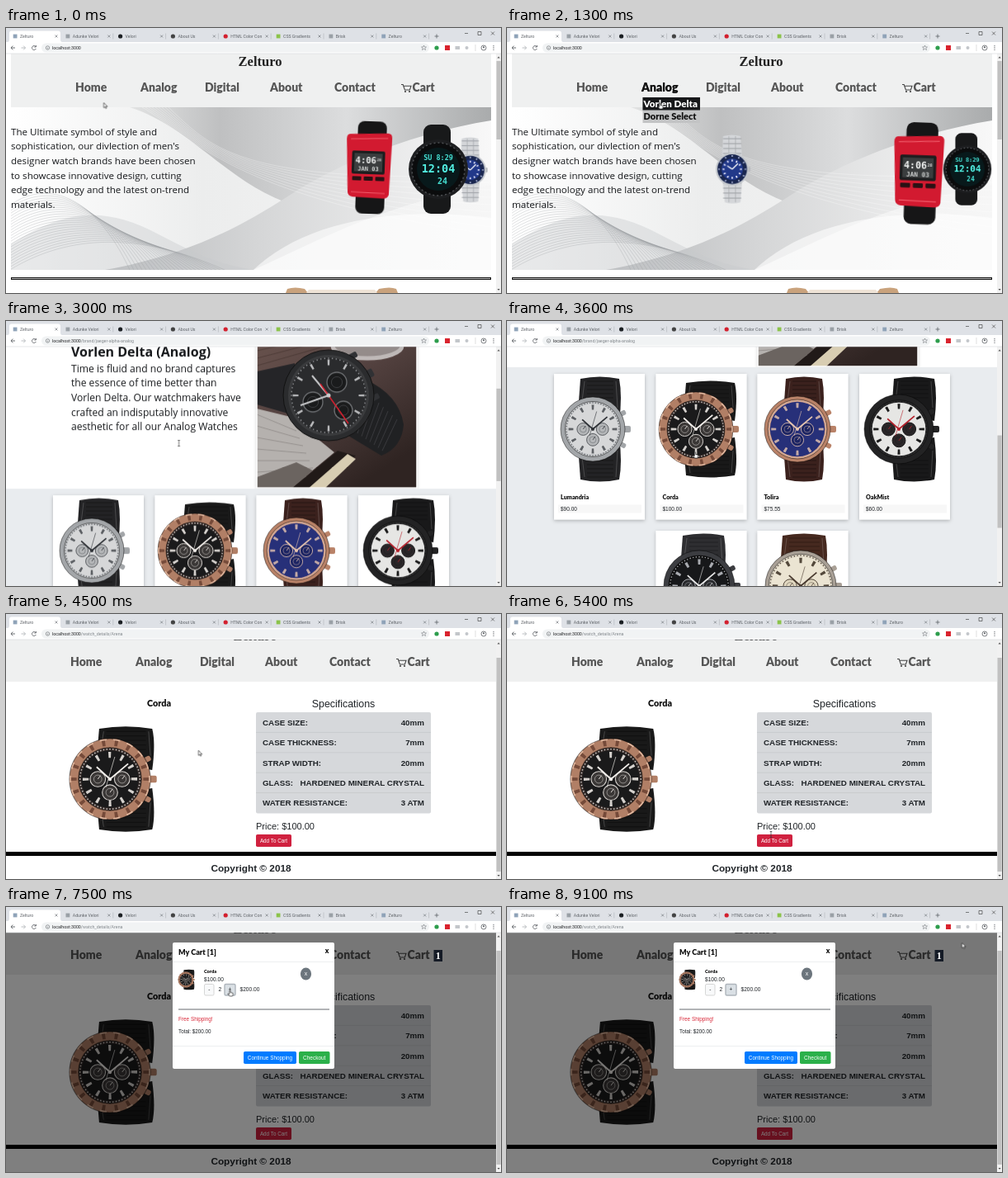
An HTML page for the animation above (9200 ms loop, 600x321 px).

```html
<!DOCTYPE html>
<html lang="en">
<head>
<meta charset="utf-8">
<title>Watch shop</title>
<style>
html, body { margin: 0; width: 100%; height: 100%; overflow: hidden; background: #fff; }
svg { display: block; width: 100vw; height: 100vh; }
text { white-space: pre; }
.body { font-family: 'Open Sans', sans-serif; font-size: 11.6px; fill: #16181b; }
.name { font-family: Lato, sans-serif; font-weight: 900; fill: #111; }
.nav { font-family: Lato, sans-serif; font-weight: 900; font-size: 14px; fill: #555; }
.logo { font-family: 'Liberation Serif', serif; font-weight: 700; font-size: 16.5px; fill: #222; }
.ui { font-family: 'Liberation Sans', sans-serif; fill: #212529; }
.bold { font-weight: 700; }
.tab { font-family: Roboto, sans-serif; font-size: 5.2px; fill: #5f6368; }
.mid { text-anchor: middle; }
.end { text-anchor: end; }
.white { fill: #fff; }
.black { fill: #111; }
.red { fill: #d92b3c; }
.lcd { font-family: 'DejaVu Sans Mono', monospace; font-weight: 700; text-anchor: middle; }
</style>
</head>
<body>
<script>
const LOOP = 9200;
let css = '';

const text = (x, y, cls, str, size, extra = '') =>
  `<text x="${x}" y="${y}" class="${cls}" ${size ? `style="font-size:${size}px"` : ''} ${extra}>${str}</text>`;
const rect = (x, y, w, h, fill, extra = '') =>
  `<rect x="${x}" y="${y}" width="${w}" height="${h}" fill="${fill}" ${extra}/>`;
const circle = (x, y, r, fill, extra = '') =>
  `<circle cx="${x}" cy="${y}" r="${r}" fill="${fill}" ${extra}/>`;
const path = (d, fill, extra = '') => `<path d="${d}" fill="${fill}" ${extra}/>`;
const line = (d, color, w = 1, extra = '') =>
  `<path d="${d}" fill="none" stroke="${color}" stroke-width="${w}" ${extra}/>`;
const ticks = (r, n, w, share, color) =>
  circle(0, 0, r, 'none', `stroke="${color}" stroke-width="${w}" pathLength="${n}" stroke-dasharray="${share} ${1 - share}" stroke-dashoffset="${share / 2}"`);
const group = (id, inner) => `<g id="${id}">${inner}</g>`;
const at = (x, y, inner, s = 1) => `<g transform="translate(${x} ${y}) scale(${s})">${inner}</g>`;
const turn = (deg, inner) => `<g transform="rotate(${deg})">${inner}</g>`;
const many = (n, fn) => Array.from({ length: n }, (_, i) => fn(i)).join('');

// Keyframes from [ms, declarations] pairs
function anim(id, keys, ease = 'linear') {
  const all = [[0, keys[0][1]], ...keys, [LOOP, keys[keys.length - 1][1]]];
  css += `@keyframes ${id}{${all.map(([t, d]) => `${(t / LOOP * 100).toFixed(3)}%{${d}}`).join('')}}
#${id}{animation:${id} ${LOOP}ms ${ease} infinite}`;
}
function show(id, ...spans) {
  const keys = [[0, 'opacity:0']];
  for (const [from, to] of spans) {
    keys.push([from, 'opacity:1']);
    if (to < LOOP) keys.push([to, 'opacity:0']);
  }
  anim(id, keys[1][0] ? keys : keys.slice(1), 'step-end');
}
const move = (x, y, s = 1) => `transform:translate(${x}px,${y}px) scale(${s})`;

// Analog watch, case centred on the origin
function watch({ r = 40, left = -15, right = 32, len = 61, face = .86, strap, rim, ring, dial, mark, sub, hand, knurl }) {
  const band = k => path(`M${left - 3},${20 * k}L${left},${len * k}Q${(left + right) / 2},${(len + 5) * k} ${right},${len * k}Q${right + 4},${40 * k} ${right},${10 * k}Z`, strap)
    + line(`M${left + 5},${(len - 3) * k}L${left + 2},${34 * k}M${right - 4},${(len - 3) * k}L${right - 2},${26 * k}`, '#fff', .6, 'opacity=".3"')
    + many(5, i => line(`M${left + 8},${(len - 3 - i * 5) * k}H${right - 7}`, '#000', 1.2, 'opacity=".3"'));
  return band(-1) + band(1)
    + rect(r - 3, -4, 10, 8, rim, 'rx="2"')
    + [-1, 1].map(k => turn(28 * k, rect(r - 3, -3, 9, 6, rim, 'rx="2"'))).join('')
    + circle(0, 0, r, rim, 'stroke="#0007" stroke-width="1"')
    + (knurl ? ticks(r - 4, 18, 8, .25, knurl) + ticks(r - 1, 18, 1.5, .5, '#e2b9a0') : '')
    + circle(0, 0, r * face, ring, 'stroke="#0007" stroke-width="1"')
    + circle(0, 0, r * (face - .07), dial)
    + ticks(r * (face - .18), 12, r * .15, .2, mark)
    + ticks(r * (face - .04), 60, 1.4, .35, mark)
    + [[-.3, 0], [.3, 0], [0, .33]].map(([x, y]) =>
        circle(x * r, y * r, r * .19, sub, `stroke="${mark}" stroke-width="1"`)
        + circle(x * r, y * r, r * .1, 'none', `stroke="${mark}" stroke-width=".5"`)
        + line(`M${x * r},${y * r}l3,-4`, hand, .8)).join('')
    + line(`M0,0L${-r * .33},${-r * .3}M0,0L${r * .45},${-r * .38}`, hand, 1.7)
    + line(`M${-r * .1},${r * .2}L${r * .12},${-r * .55}`, hand, .6) + circle(0, 0, 2, hand);
}
const STYLES = {
  silver: { strap: '#232325', rim: '#a3a6a9', ring: '#c6c8ca', dial: '#d6d7d8', mark: '#5d6064', sub: '#b4b6b8', hand: '#303338', r: 39 },
  rose: { strap: '#191919', rim: '#b17f66', ring: '#352c2a', dial: '#1a1a1b', mark: '#d5d1cd', sub: '#3a3736', hand: '#f2eeea', knurl: '#754a39', r: 45, left: -12, right: 47, len: 56, face: .78 },
  blue: { strap: '#3b211d', rim: '#b98268', ring: '#d6a58c', dial: '#273079', mark: '#c3a9a6', sub: '#1c2463', hand: '#e4c3af', left: -14, right: 30, face: .9 },
  black: { strap: '#19191a', rim: '#232324', ring: '#2b2b2c', dial: '#e6e6e4', mark: '#1b1b1b', sub: '#2a2628', hand: '#b5222d', r: 42, left: -6, right: 43, face: .84 },
  dark: { strap: '#2e2e31', rim: '#3c3d41', ring: '#111', dial: '#17181a', mark: '#a9abb0', sub: '#292a2d', hand: '#e6e6e6', r: 43, left: -20, right: 30 },
  cream: { strap: '#46291f', rim: '#a9a096', ring: '#ded6c6', dial: '#ebe4d2', mark: '#54493c', sub: '#e0d7c0', hand: '#4a3b30', r: 43, left: -22, right: 30, face: .9 }
};
const model = key => watch(STYLES[key]);

const redWatch = turn(2, `${rect(-15, -56, 35, 112, '#161617', 'rx="8"')}
${path('M-24,-40L22,-42Q27,-42 27,-36L25,32Q24,37 18,37L-19,36Q-25,35 -25,30L-28,-34Q-28,-40 -24,-40Z', '#d21a30')}
${line('M-23,-34L22,-36M-21,30L20,31', '#ef5a69', 1.2)}
${rect(-21, -20, 40, 28, '#1c1d1e', 'rx="2"')}${rect(-18, -17, 34, 22, '#3a3d3e')}
${text(-4, -5, 'lcd', '4:06', 10.5, 'fill="#f1f3f2"')}${text(12, -8, 'lcd', '28', 4.5, 'fill="#ddd"')}
${text(-1, 4, 'lcd', 'JAN 03', 7, 'fill="#cfd2d1"')}
${[-20, -6, 8].map(x => rect(x, 11, 11, 5, '#2a1114', 'rx="1"')).join('')}`);

const blackWatch = rect(-18, -54, 33, 108, '#18191a', 'rx="9"')
  + circle(0, 0, 36, '#1d1e20') + circle(0, 0, 32, '#0b0c0d', 'stroke="#4b4d50" stroke-width="1.5" stroke-dasharray="2 3"')
  + circle(0, 0, 26, '#08191b')
  + text(0, -11, 'lcd', 'SU 8:29', 8.5, 'fill="#45dfd2"') + text(0, 4, 'lcd', '12:04', 13.5, 'fill="#52f0e2"')
  + text(5, 18, 'lcd', '24', 10, 'fill="#45dfd2"');

const steelWatch = path('M-11,-40Q0,-43 10,-40L13,0L10,40Q0,43 -9,40L-13,0Z', '#d4d6d9')
  + many(13, i => line(`M-11,${-37 + i * 6}H11`, '#8f9398', .8)) + line('M-4,-40V40M4,-40V40', '#a4a8ac', .7)
  + rect(17, -3, 5, 6, '#b6b9bd', 'rx="1"') + circle(0, 0, 20, '#c4c8cd') + circle(0, 0, 18, '#1a2750')
  + ticks(16, 12, 2, .2, '#aab4d6') + circle(0, 0, 13, '#22398a') + ticks(10.5, 12, 2.4, .3, '#eef')
  + line('M0,0L-6,-4M0,0L7,-7', '#fff', 1.3);

function header(x0, w, dx) {
  const items = [['Home', 84], ['Analog', 163], ['Digital', 241], ['About', 320], ['Contact', 398], ['Cart', 492.5]];
  return rect(x0, 31, w, 65, '#eff0f0') + text(308 + dx, 46, 'logo mid', 'Zelturo')
    + items.map(([s, x]) => text(x + dx, 77, 'nav', s)).join('')
    + at(dx, 0, line('M479,68.5h2.2l2.2,6.5h6l1.6,-4.8h-8.6', '#444', 1.1) + circle(484, 77, 1.1, '#444') + circle(489, 77, 1.1, '#444'));
}

// Landing page
const waves = `<g clip-path="url(#heroBox)">${rect(6, 96, 582, 197, 'url(#heroBase)')}
${path('M150,96C225,120 270,190 350,215C430,238 520,215 588,165V96Z', 'url(#sweep)')}
${path('M588,112C490,128 400,165 340,205C280,243 220,275 120,293H300C370,262 450,215 588,190Z', 'url(#ribbon)')}
${path('M6,262C70,220 120,215 185,250C225,270 250,285 300,293H6Z', '#c6c8ca', 'opacity=".4"')}
${path('M300,293C360,235 470,215 588,230V293Z', '#fff', 'opacity=".6"')}
${many(24, i => line(`M6,${214 + i * 3.4}C${45 + i},${186 + i * 3} ${105 + i * 2},${196 + i * 2} ${150 + i * 5},293`, '#8d9195', .4, 'opacity=".65"'))}
${many(9, i => line(`M${165 + i * 4},96C${225 + i * 3},${130 + i * 2} ${270 + i * 2},${205 - i * 2} 588,${250 - i * 9}`, '#fff', .5, 'opacity=".6"'))}</g>`;
const intro = ['The Ultimate symbol of style and', "sophistication, our divlection of men's", 'designer watch brands have been chosen',
  'to showcase innovative design, cutting', 'edge technology and the latest on-trend', 'materials.'];
const menu = text(163, 77, 'nav black', 'Analog')
  + rect(164.5, 84, 69.5, 31, '#c3c4c5')
  + text(165.5, 95.5, 'name', 'Vorlen Delta', 11.6)
  + group('menuHot', rect(164.5, 84, 69.5, 15.5, '#17181a') + text(165.5, 95.5, 'name white', 'Vorlen Delta', 11.6))
  + text(165.5, 111, 'name', 'Dorne Select', 11);
const home = header(6, 582, 0) + waves
  + intro.map((s, i) => text(6, 129.5 + i * 17.7, 'body', s)).join('')
  + group('steel', steelWatch) + group('digital', blackWatch) + group('red', redWatch)
  + rect(6.5, 302.5, 581, 2, '#bbb', 'stroke="#111"')
  + path('M339,321L341,316Q350,313 362,316L366,321ZM448,321L452,316Q466,313 473,316L475,321Z', '#c9a27c')
  + path('M364,321L367,317H447L450,321Z', '#efe3d6') + group('menu', menu);

// Brand page
const chrono = circle(0, 0, 55, '#2b2c2e', 'stroke="#111"') + circle(0, 0, 49, '#3a3b3d') + circle(0, 0, 46, '#2a2b2d')
  + ticks(40, 12, 7, .12, '#b9babc') + ticks(45, 60, 1.5, .3, '#8c8e91')
  + [[-19, 8, 12], [18, 18, 11], [10, -16, 12]].map(([x, y, r]) => circle(x, y, r, '#1a1b1c', 'stroke="#6d6f72" stroke-width="1.3"') + circle(x, y, r * .55, 'none', 'stroke="#55575a" stroke-width=".6"')).join('')
  + line('M0,0L-20,-24M0,0L-34,12', '#c5c6c8', 2) + line('M-10,-14L24,34', '#d8202f', 1.5) + circle(0, 0, 2.5, '#ccc');
const photo = `<g clip-path="url(#photoBox)">${rect(304, 105, 194, 207, 'url(#desk)')}
${many(6, i => line(`M304,${118 + i * 9}L420,${100 + i * 6}`, '#3d2c29', 1.2, 'opacity=".5"'))}
<ellipse cx="438" cy="139" rx="42" ry="15" fill="#a9a4a3" stroke="#e3e1e0" stroke-width="5" opacity=".75"/>
${path('M304,215L345,225L398,268L345,312H304Z', '#b5b1ae')}
${many(7, i => line(`M304,${222 + i * 14}L${352 + i * 4},${242 + i * 9}`, '#8f8a87', .8))}
${path('M304,298L352,280L372,290L346,312H304Z', '#6b6460')}
${path('M346,312L402,266L424,272L380,312Z', '#211a18')}
${path('M366,312L414,270L424,276L386,312Z', '#d8cdb2')}
${path('M304,170L350,160L356,225L304,210Z', '#252528')}
${path('M436,180Q476,198 482,234Q480,262 455,272L402,240Z', '#202123')}
${many(9, i => line(`M${430 + i * 5.5},${188 + i * 5}L${416 + i * 5},${238 + i * 3.5}`, '#45464a', .7))}
${at(391, 199, turn(-28, rect(50, -5, 11, 10, '#303134', 'rx="2"') + rect(42, -32, 12, 7, '#303134', 'rx="2"') + rect(42, 25, 12, 7, '#303134', 'rx="2"')) + chrono)}</g>
${rect(304, 105, 194, 206, 'none', 'stroke="#fff" stroke-width="1.5"')}`;
const pitch = ['Time is fluid and no brand captures', 'the essence of time better than', 'Vorlen Delta. Our watchmakers have',
  'crafted an indisputably innovative', 'aesthetic for all our Analog Watches'];
const card = (x, y, kind, cx, name = '', price = '') => rect(x, y, 110, 176.5, '#fff', 'filter="url(#lift)"')
  + at(cx, y + 67, model(kind)) + text(x + 8, y + 151.5, 'name', name, 7.2)
  + rect(x + 5, y + 158.5, 101, 10, '#f7f7f7') + text(x + 8, y + 166, 'ui', price, 6.5);
const brand = rect(0, 31, 594, 800, '#fff') + header(0, 594, -6)
  + text(79, 151.5, 'body bold', 'Vorlen Delta (Analog)', 16) + pitch.map((s, i) => text(79, 170.5 + i * 17.7, 'body', s, 12.1)).join('')
  + rect(304, 105, 194, 206, '#888', 'filter="url(#lift)"') + photo + rect(0, 312, 594, 450, '#e9ecef')
  + card(57, 320, 'silver', 104, 'Lumandria', '$90.00') + card(180.5, 320, 'rose', 229, 'Corda', '$100.00')
  + card(303.5, 320, 'blue', 352, 'Tolira', '$75.55') + card(427, 320, 'black', 475, 'OakMist', '$60.00')
  + card(180.5, 510, 'dark', 233) + card(303.5, 510, 'cream', 356);

// Product page
const specs = [['CASE SIZE:', '40mm'], ['CASE THICKNESS:', '7mm'], ['STRAP WIDTH:', '20mm'], ['GLASS:', 'HARDENED MINERAL CRYSTAL'], ['WATER RESISTANCE:', '3 ATM']];
const label = (x, y, s, size = 6.5) => text(x, y, 'ui mid white', s, size);
const detail = rect(0, 31, 594, 290, '#fff') + at(0, -14, header(0, 594, -6))
  + text(185.5, 112, 'name mid', 'Corda', 10.8) + at(126, 200, model('rose'), 1.09)
  + text(409, 113, 'ui mid', 'Specifications', 12.4) + rect(303, 119, 212, 122.5, '#d6d8db', 'rx="2"')
  + specs.map(([k, v], i) => text(311, 135 + i * 24.3, 'ui bold', k, 9.8) + text(507, 135 + i * 24.3, 'ui bold end', v, 9.8)
      + (i ? line(`M303,${119 + i * 24.4}H515`, '#c3c6c9', .7) : '')).join('')
  + text(303, 261, 'ui', 'Price: $100.00', 11) + rect(303, 267, 43, 15, '#d0213f', 'rx="1.8"') + label(324.5, 277, 'Add To Cart', 6.3)
  + rect(0, 288, 594, 5, '#000') + text(297, 312, 'ui bold mid', 'Copyright © 2018', 11.8);

const amounts = (n, sum) => text(257.5, 102, 'ui', n, 6.6) + text(283.5, 102, 'ui', sum, 6.6) + text(209, 153, 'ui', 'Total: ' + sum, 6.3);
const modal = rect(202, 43, 196, 153, '#fff', 'rx="2"') + text(209, 57.5, 'name', 'My Cart [1]', 9)
  + text(389, 56, 'name mid', 'x', 8.5) + line('M202,66.5H398M202,168.5H398', '#e6e8ea', .7)
  + at(218, 88, model('rose'), .21) + text(240, 80, 'name', 'Corda', 5.6) + text(240, 90, 'ui', '$100.00', 6.6)
  + rect(240.5, 93.5, 11.5, 13.5, '#f8f9fa', 'rx="1.5" stroke="#ccc" stroke-width=".8"') + text(246.3, 102, 'ui mid', '-', 6.5)
  + rect(265, 93.5, 13, 13.5, '#dae0e5', 'rx="1.5" stroke="#aeb5bc" stroke-width="1.4"') + text(271.5, 102.2, 'ui mid', '+', 6.5)
  + group('one', amounts(1, '$100.00')) + group('two', amounts(2, '$200.00'))
  + '<ellipse cx="363.5" cy="81" rx="6.6" ry="7.5" fill="#6c757d"/>' + label(363.5, 83.2, 'x', 7)
  + line('M209,124H392', '#666a6e', 1.1) + text(209, 138, 'ui red', 'Free Shipping!', 6.4)
  + rect(288, 175, 64, 15, '#007bff', 'rx="1.8"') + label(320, 185, 'Continue Shopping', 6.4)
  + rect(355, 175, 37.5, 15, '#2bb04a', 'rx="1.8"') + label(373.7, 185, 'Checkout', 6.5);

// Browser frame
const tabs = [['Zelturo', '#8fa3b8'], ['Adunke Velori', '#9aa0a6'], ['Velori', '#1b1f23'], ['About Us', '#444'],
  ['HTML Color Con', '#d3202f'], ['CSS Gradients', '#8bc34a'], ['Brisk', '#9aa0a6'], ['Zelturo', '#8fa3b8']];
const url = rest => text(56, 25.8, 'tab', `<tspan fill="#202124">localhost:3000</tspan><tspan fill="#80868b">${rest}</tspan>`, 5.3);
const chrome = rect(0, 0, 600, 17, '#dee1e6') + path('M2,17Q4,17 4,14V6Q4,3.5 7,3.5H63Q66,3.5 66,6V14Q66,17 68,17Z', '#fff')
  + tabs.map(([s, c], i) => {
      const x = 11 + i * 63.8;
      return ([2, 3, 4].includes(i) ? circle(x, 10, 2.6, c) : rect(x - 2.3, 7.6, 4.8, 4.8, c)) + text(x + 6, 12, 'tab', s)
        + line(`M${x + 48.5},8.5l3,3m0,-3l-3,3`, '#5f6368', .6) + (i ? line(`M${x + 55},6.5v7`, '#a5a9ae', .5) : '');
    }).join('')
  + line('M519.5,10h5M522,7.5v5', '#5f6368', .8)
  + line('M556,6.5h4M572,4.5h4v4h-4zM588,4.5l4,4m0,-4l-4,4', '#333', .6)
  + rect(0, 17, 600, 14, '#fff') + rect(43, 18.5, 470, 11, '#f1f3f4', 'rx="5.5"')
  + line('M11,24H6m2.3,-2.4L6,24l2.3,2.4', '#5f6368', .9) + line('M18.5,24h5m-2.3,-2.4l2.3,2.4l-2.3,2.4', '#b5b8bc', .9)
  + line('M36,22.6A2.5,2.5 0 1 0 36.3,25M36.4,21v2h-2', '#5f6368', .9)
  + circle(50.5, 24, 2.2, 'none', 'stroke="#5f6368" stroke-width=".6"') + line('M50.5,23.6v1.6', '#5f6368', .6)
  + group('urlHome', url('')) + group('urlBrand', url('/brand/jaeger-alpha-analog')) + group('urlItem', url('/watch_details/Arena'))
  + line('M506.5,21l.9,2h2.1l-1.6,1.4l.6,2.1l-2,-1.2l-2,1.2l.6,-2.1l-1.6,-1.4h2.1Z', '#5f6368', .5)
  + circle(522, 24, 2.6, '#2e9d4d') + rect(532, 21, 6, 6, '#d9232e') + rect(544.5, 22, 5.5, 4, '#c3c6ca') + circle(558.5, 24, 2, '#c3c6ca')
  + line('M569,20v8', '#ccc', .6) + circle(579, 24, 3, 'none', 'stroke="#5f6368" stroke-width=".8"') + circle(579, 23.3, 1.1, '#5f6368')
  + [21.7, 24, 26.3].map(y => circle(591, y, .65, '#5f6368')).join('')
  + line('M0,31H600', '#d5d7da', .6);
const thumb = (y, h) => rect(594.5, y, 5.2, h, '#c1c1c1');
const scrollbar = rect(594, 31, 6, 290, '#f1f1f1') + path('M595.5,36.5l1.6,-2l1.6,2Z', '#555') + path('M595.5,316l1.6,2l1.6,-2Z', '#555')
  + group('barHome', thumb(40, 95)) + group('barBrand', group('barMove', thumb(40, 112))) + group('barItem', thumb(53, 259));

const cursor = group('arrow', path('M0,0V6.2L1.5,4.9L2.5,7L3.4,6.6L2.5,4.5H4.4Z', '#fff', 'stroke="#111" stroke-width=".6"'))
  + group('beam', line('M-1.3,-3.5h2.6M0,-3.5v7M-1.3,3.5h2.6', '#333', .7))
  + group('hand', path('M-.7,0Q0,-1 .7,0V2.6L3.6,3.3Q4.2,5 3,7H-.5L-2.6,4L-.7,4.4Z', '#fff', 'stroke="#111" stroke-width=".6"'));

const stop = (o, c) => `<stop offset="${o}" stop-color="${c}"/>`;
document.body.insertAdjacentHTML('beforeend', `<svg viewBox="0 0 600 321" preserveAspectRatio="none">
<defs>
<linearGradient id="heroBase">${stop(0, '#fff')}${stop(.4, '#eceded')}${stop(1, '#f6f6f6')}</linearGradient>
<linearGradient id="sweep">${stop(0, '#e2e3e3')}${stop(.25, '#bfc0c1')}${stop(.6, '#dcddde')}${stop(1, '#a9abac')}</linearGradient>
<linearGradient id="ribbon">${stop(0, '#b9bbbd')}${stop(.4, '#d5d6d7')}${stop(1, '#f8f8f8')}</linearGradient>
<linearGradient id="desk" x2=".6" y2="1">${stop(0, '#6d5650')}${stop(.5, '#544240')}${stop(1, '#2f2422')}</linearGradient>
<clipPath id="heroBox">${rect(6, 96, 582, 197, '#000')}</clipPath>
<clipPath id="photoBox">${rect(304, 105, 194, 206, '#000')}</clipPath>
<filter id="lift" x="-10%" y="-10%" width="120%" height="120%"><feDropShadow dx="0" dy="1.5" stdDeviation="2" flood-opacity=".25"/></filter>
</defs>
${rect(0, 0, 600, 321, '#fff')}
${group('home', home)}${group('brand', group('scroll', brand))}${group('item', detail)}
${group('dim', rect(0, 31, 594, 290, '#000'))}
${group('badge', rect(518.5, 52, 10.5, 14, '#151b26') + text(523.8, 63, 'logo mid white', '1', 12))}
${group('modal', modal)}${scrollbar}${chrome}${group('cursor', cursor)}</svg>`);

const OPEN = 1600, PICK = 4300, ADD = 6200, PLUS = 7500;
for (const id of ['home', 'urlHome', 'barHome']) show(id, [0, OPEN]);
for (const id of ['brand', 'urlBrand', 'barBrand']) show(id, [OPEN, PICK]);
for (const id of ['item', 'urlItem', 'barItem']) show(id, [PICK, LOOP]);
show('menu', [850, OPEN]);
show('menuHot', [1100, OPEN]);
show('badge', [ADD, LOOP]);
show('one', [0, PLUS]);
show('two', [PLUS, LOOP]);

anim('red', [[0, move(440, 169)], [1300, move(499, 176, 1.1)], [OPEN, move(513, 177, 1.12)]]);
anim('digital', [[0, move(524, 171)], [1300, move(558, 171, .81)], [OPEN, move(560, 171, .77)]]);
anim('steel', [[0, move(563, 172, .95)], [650, move(420, 170, .8)], [1300, move(273, 171)], [OPEN, move(262, 171, 1.04)]]);

const scrolls = [[2100, 0], [2500, 98], [2900, 98], [3450, 256]];
anim('scroll', scrolls.map(([t, y]) => [t, move(0, -y)]), 'ease-in-out');
anim('barMove', scrolls.map(([t, y]) => [t, move(0, y * .385)]), 'ease-in-out');

anim('dim', [[ADD, 'opacity:0'], [ADD + 150, 'opacity:.5']]);
anim('modal', [[6430, 'opacity:0;' + move(0, -22)], [6730, 'opacity:1;' + move(0, 0)]], 'ease-out');

anim('cursor', [[0, 118.5, 90.5], [450, 118.5, 90.5], [900, 180, 74], [1200, 185.5, 91], [1650, 185.5, 91], [2200, 209.5, 148],
  [3000, 209.5, 148], [3500, 228, 159], [4400, 228, 159], [5000, 320, 267], [5450, 320, 267], [5700, 321, 274], [6200, 321, 274],
  [6400, 259, 218], [6950, 271.5, 101], [8100, 271.5, 101], [8800, 551.5, 43.5]].map(([t, x, y]) => [t, move(x, y)]), 'ease-in-out');
show('arrow', [0, 850], [OPEN, 1950], [PICK, 4950], [ADD, 6850], [8200, LOOP]);
show('beam', [1950, 3100], [4950, 5550]);
show('hand', [850, OPEN], [3100, PICK], [5550, ADD], [6850, 8200]);

document.head.insertAdjacentHTML('beforeend', `<style>${css}</style>`);
</script>
</body>
</html>
```
